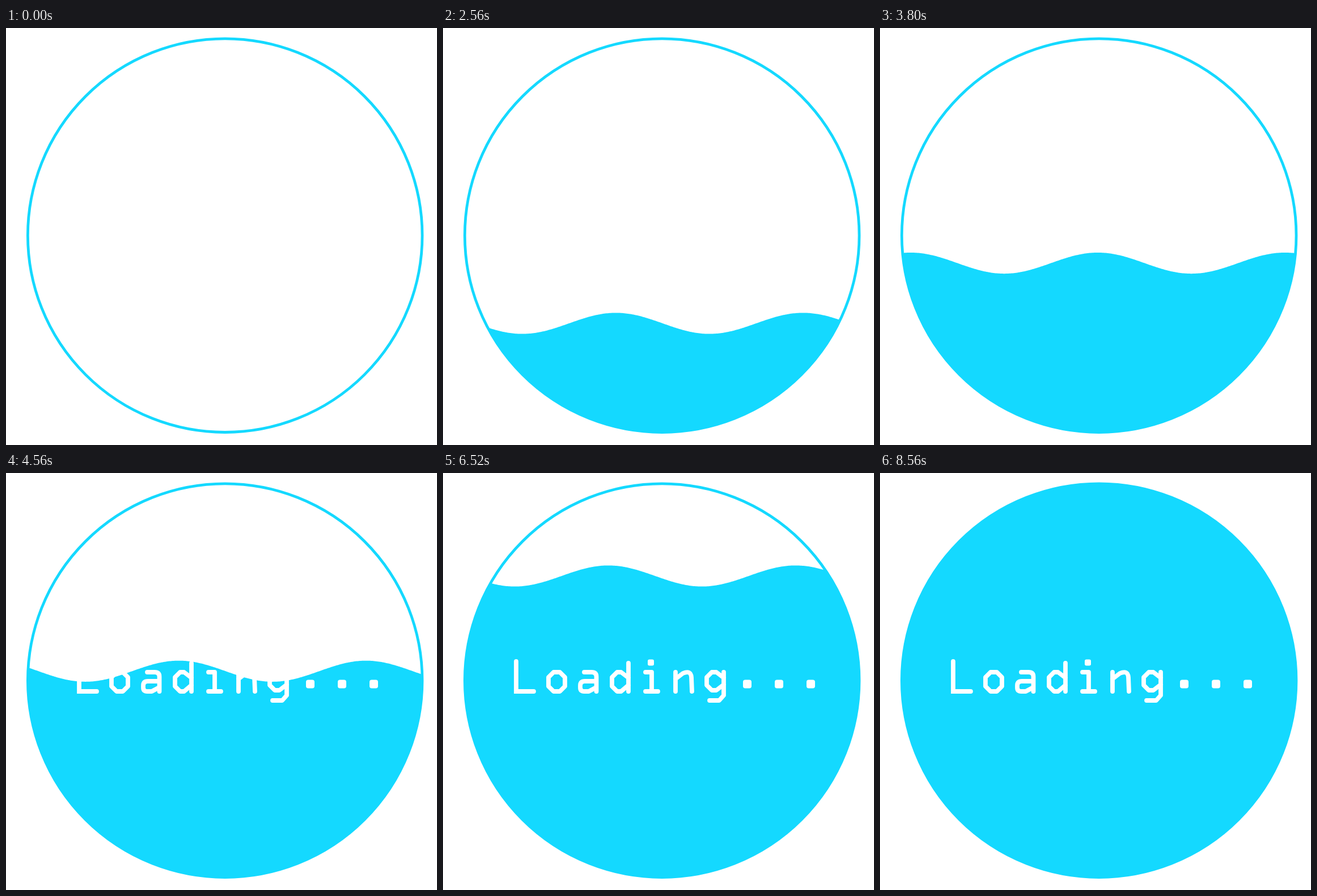
Recreate the animation shown at these times as an HTML page with a canvas. Size 760 by 737 pixels, loop 8800 ms.

```html
<!DOCTYPE html>
<html lang="en">
<head>
<meta charset="utf-8">
<title>Loading</title>
<style>
  html, body { margin: 0; width: 100%; height: 100%; overflow: hidden; background: #fff; }
  canvas { display: block; }
</style>
</head>
<body>
<canvas id="stage" width="760" height="737" role="img" aria-label="Loading..."></canvas>
<script>
const ctx = document.getElementById('stage').getContext('2d');
const W = 760, H = 737, LOOP = 8800, STEP = 40;
const WATER = '#14d9ff';
const ring = { x: 386.2, y: 366.7, r: 347.8, line: 4.8 };
const wave = { length: 330, height: 18.6, startX: 120, startY: 741.8, drift: 0.33, rise: 0.08586 };

// Monoline lettering: one stroked path for each letter
const letters = [
  'M129 333V386H160',
  'M195 352H206L215 361V377L206 386H195L186 377V361Z',
  'M249 352H262Q270.5 352 270.5 360V386M270 368H250Q242 368 242 376V379Q242 386 249 386H257L270 379',
  'M327 336V386M327 362L314 352H307L298 361V377L307 386H314L327 375',
  'M357 352H368V386M357 386H379',
  'M410 352V386M410 364L423 354Q437 348 438 361L439 386',
  'M495 352V393L487 402H470M495 362L482 352H474L465 361V375L474 384H482L495 374'
].map(d => new Path2D(d));

const dots = [[361, 329.5, 11, 3], [529, 365.5, 15, 4], [585, 365.5, 15, 4], [641, 365.5, 15, 4]];

function circle() {
  ctx.beginPath();
  ctx.arc(ring.x, ring.y, ring.r, 0, Math.PI * 2);
}

function drawWater(t) {
  const crest = wave.startX + wave.drift * t;
  const level = wave.startY - wave.rise * t;
  ctx.save();
  circle();
  ctx.clip();
  ctx.beginPath();
  ctx.moveTo(0, H);
  for (let x = 0; x <= W; x += 2) {
    ctx.lineTo(x, level - wave.height * Math.cos((x - crest) / wave.length * Math.PI * 2));
  }
  ctx.lineTo(W, H);
  ctx.fillStyle = WATER;
  ctx.fill();
  ctx.restore();
}

function drawLabel() {
  ctx.strokeStyle = ctx.fillStyle = '#fff';
  ctx.lineWidth = 7.8;
  ctx.lineCap = 'round';
  letters.forEach((path, i) => {
    ctx.lineJoin = i ? 'round' : 'miter';
    ctx.stroke(path);
  });
  for (const [x, y, size, radius] of dots) {
    ctx.beginPath();
    ctx.roundRect(x, y, size, size, radius);
    ctx.fill();
  }
}

function draw(t) {
  ctx.fillStyle = '#fff';
  ctx.fillRect(0, 0, W, H);
  drawWater(t);
  drawLabel();
  circle();
  ctx.strokeStyle = WATER;
  ctx.lineWidth = ring.line;
  ctx.stroke();
}

function tick() {
  const t = performance.now() % LOOP;
  draw(Math.floor(t / STEP) * STEP);
  requestAnimationFrame(tick);
}
tick();
</script>
</body>
</html>
```
